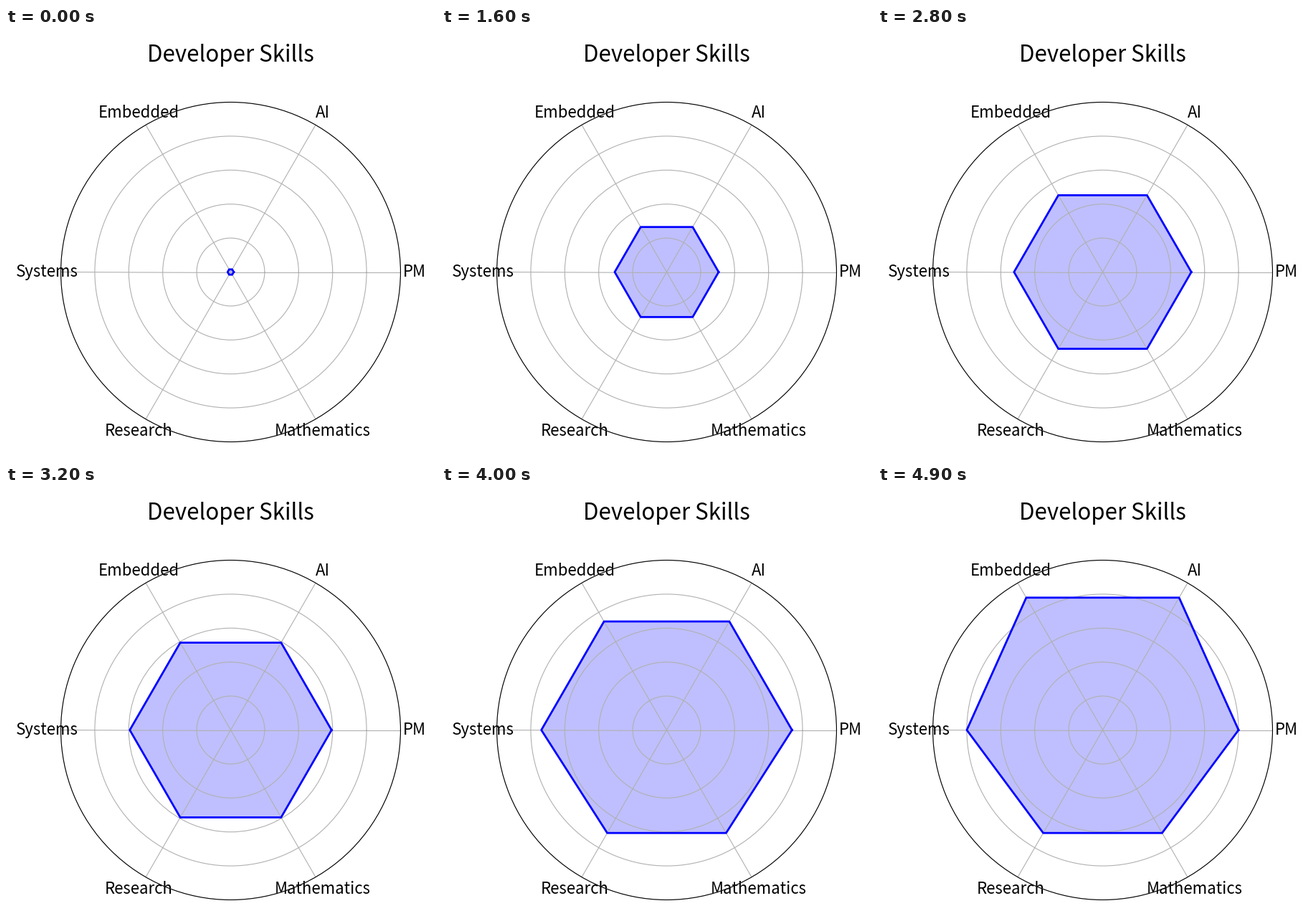
A matplotlib script for the animation above (5000 ms loop, 600 by 600 pixels).

```python
import numpy as np
import matplotlib.pyplot as plt
from matplotlib.animation import FuncAnimation

SIZE, DPI = 600, 100
FRAMES, INTERVAL = 50, 100
CENTER_X, CENTER_Y, RADIUS = 313.5, 340.5, 237  # pixels, y measured from the top

SKILLS = {
    "PM": 8,
    "AI": 9,
    "Embedded": 9,
    "Systems": 8,
    "Research": 7,
    "Mathematics": 7,
}

plt.rcParams["font.family"] = "Noto Sans CJK JP"

scores = np.array(list(SKILLS.values()), dtype=float)
angles = np.linspace(0, 2 * np.pi, len(scores), endpoint=False)
closed_angles = np.append(angles, angles[0])

fig = plt.figure(figsize=(SIZE / DPI, SIZE / DPI), dpi=DPI, facecolor="white")
ax = fig.add_axes(
    [
        (CENTER_X - RADIUS) / SIZE,
        1 - (CENTER_Y + RADIUS) / SIZE,
        2 * RADIUS / SIZE,
        2 * RADIUS / SIZE,
    ],
    projection="polar",
)
ax.set_ylim(0, 10)
ax.set_yticks([2, 4, 6, 8, 10])
ax.set_yticklabels([])
ax.set_xticks(angles)
ax.set_xticklabels(SKILLS, fontsize=16)
fig.text(CENTER_X / SIZE, 1 - 47 / SIZE, "Developer Skills",
         fontsize=22.5, ha="center", va="baseline")

area, = ax.fill(closed_angles, np.zeros(len(closed_angles)), color="blue", alpha=0.25)
outline, = ax.plot(closed_angles, np.zeros(len(closed_angles)), color="blue", linewidth=2)
ax.set_ylim(0, 10)


def update(frame):
    # All axes grow at one rate; each stops at its own score.
    level = scores.max() * (frame + 1) / FRAMES
    values = np.minimum(scores, level)
    values = np.append(values, values[0])
    outline.set_data(closed_angles, values)
    area.set_xy(np.column_stack([closed_angles, values]))
    return area, outline


anim = FuncAnimation(fig, update, frames=FRAMES, interval=INTERVAL,
                     repeat=True, repeat_delay=0, blit=False)
plt.show()
```
